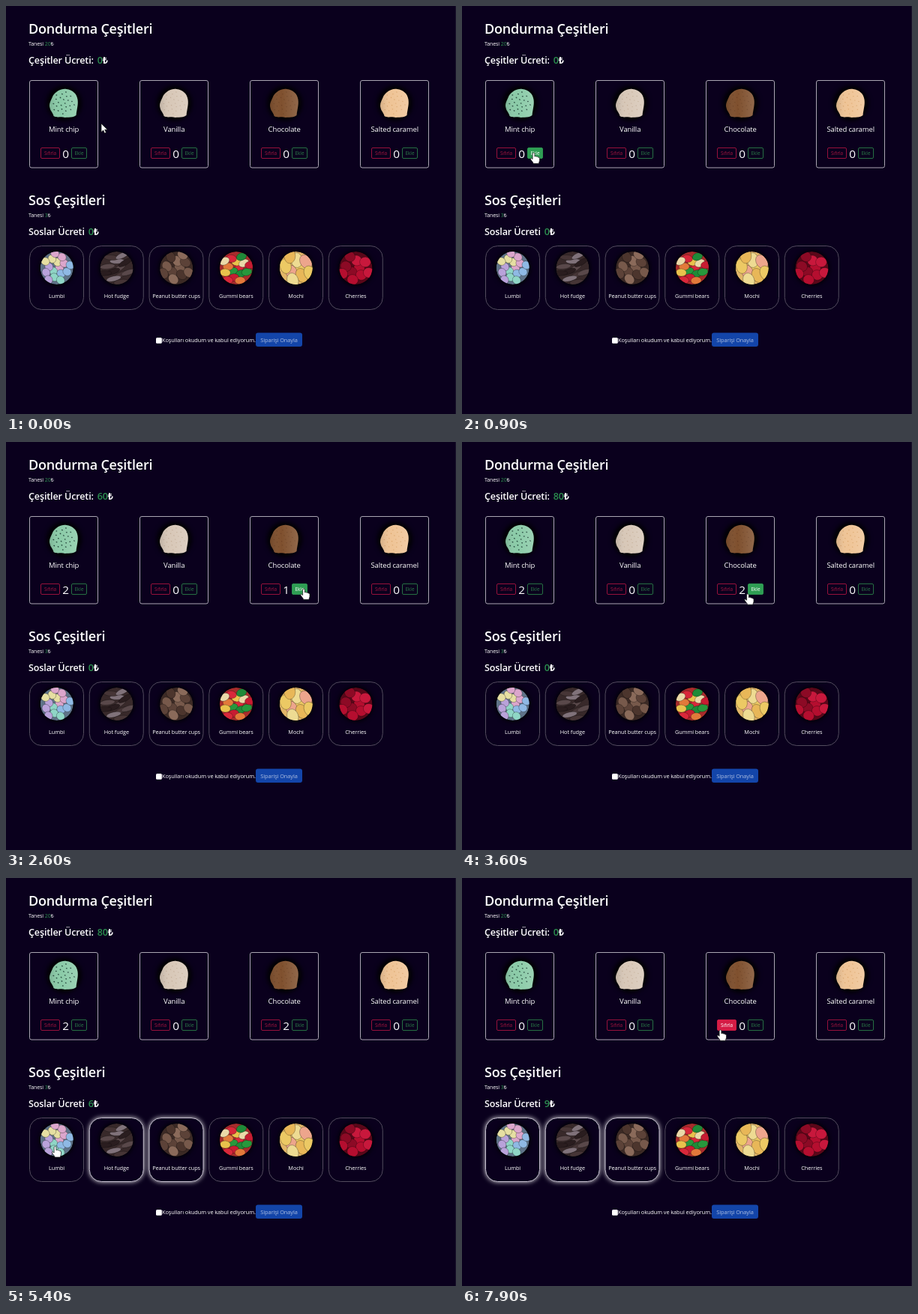
An HTML page that plays this animation: 600x545 px, repeating every 8000 ms.

```html
<!DOCTYPE html>
<html lang="tr">
<head>
<meta charset="utf-8">
<style>
html, body { margin: 0; width: 100%; height: 100%; overflow: hidden; background: #0a001d; }
svg { display: block; width: 600px; height: 545px; }
text { font-family: "Open Sans", "Noto Sans", sans-serif; letter-spacing: -.012em; fill: #fff; white-space: pre; }
.mid { text-anchor: middle; }
.sum, .title { font-weight: 600; }
.green { fill: #2c9150; }
.card { fill: none; stroke: #aaa6b2; }
.sauce rect { fill: #0a001d; stroke: #524c5d; }
.sauce.on rect { stroke: #c4bfce; filter: drop-shadow(.4px .6px 3px #fffd); }
.btn { --c: #2a7d48; --h: #2f9e54; }
.btn.red { --c: #a5143f; --h: #d51c45; }
.btn rect { fill: none; stroke: var(--c); stroke-width: .9; }
.btn text { fill: var(--c); }
.btn.on rect { fill: var(--h); stroke: var(--h); }
.btn.on text { fill: #fff; }
.shade { filter: blur(3px); }
.pieces { stroke: #0005; stroke-width: .8; }
</style>
</head>
<body>
<svg id="stage" viewBox="0 0 600 545"></svg>
<script>
// name, colour, fleck colour, fleck size
const flavours = [
  ["Mint chip", "#8bcba8", "#24483c", 1],
  ["Vanilla", "#d8c8b8", "#c3ad98", .8],
  ["Chocolate", "#7f502e", "#6d4225", .8],
  ["Salted caramel", "#efc496", "#dba66c", .8]
];
// name, backdrop, blob colours, blob count, radii, tilt
const sauces = [
  ["Lumbi", "#5f7388", ["#dca6cc", "#8fd6c6", "#e6dfa2", "#8fb9e4", "#b9a2da"], 16, 5.8, 5.2, 20],
  ["Hot fudge", "#38292a", ["#59484a", "#2a1d1f", "#80727a", "#463536"], 12, 10, 3.4, -35],
  ["Peanut butter cups", "#3c2a25", ["#77594b", "#5c4238", "#8a6a5a", "#4c352d"], 11, 7.4, 6, 25],
  ["Gummi bears", "#a82c2c", ["#d8283a", "#27983c", "#e9c24c", "#1f8a38", "#e2793a", "#ead9a8", "#c81c32"], 15, 7, 5, -30],
  ["Mochi", "#e2b668", ["#ecc964", "#eda58c", "#eedb92", "#e8b758"], 9, 10, 7.5, 50],
  ["Cherries", "#5a0719", ["#b50e2f", "#8c0a25", "#c8183c"], 10, 7.4, 6.8, 0]
];
const cardX = i => 31.5 + i * 147;
const sauceX = i => 31.5 + i * 79.75;

const text = (x, y, size, body, cls = "") =>
  `<text x="${x}" y="${y}" font-size="${size}" class="${cls}">${body}</text>`;
const box = (x, y, w, h, r, more = "") =>
  `<rect x="${x}" y="${y}" width="${w}" height="${h}" rx="${r}" ${more}/>`;
const at = (x, y, body, more = "") => `<g transform="translate(${x} ${y})" ${more}>${body}</g>`;

// Evenly spread ellipses along a sunflower spiral
function blobs(count, reach, rx, ry, tilt, colours) {
  return Array.from({ length: count }, (_, i) => {
    const r = reach * Math.sqrt((i + .5) / count), a = i * 2.4;
    const x = (r * Math.cos(a)).toFixed(1), y = (r * Math.sin(a)).toFixed(1);
    return `<ellipse rx="${rx}" ry="${ry}" fill="${colours[i % colours.length]}"
      transform="translate(${x} ${y}) rotate(${tilt + i * 17 % 40})"/>`;
  }).join("");
}

const button = (id, x, w, label, cls) =>
  `<g id="${id}" class="btn ${cls}">${box(x, 189.5, w, 14, 1.5)}${text(x + w / 2, 199, 6.4, label, "mid")}</g>`;

const dome = "M-18 6C-20 1-16-5-14-10C-10-16-3-20 4-19C12-18 18-13 19-5C20 2 18 7 17 16C12 20 7 18 2 19C-3 17-8 20-13 17C-14 12-17 11-18 6Z";
const scoop = (colour, fleck, size) => `
  <circle cx="1" r="23" class="shade"/>
  <path fill="${colour}" d="${dome}"/>
  ${blobs(24, 15.5, size, size * .75, 0, [fleck])}
  <path fill="url(#light)" d="${dome}"/>`;

const flavourCard = ([name, ...look], i) => at(cardX(i), 0,
  box(0, 99.5, 91, 116.5, 2.5, 'class="card"') +
  at(45, 130, scoop(...look)) +
  text(45.7, 168.3, 9.5, name, "mid") +
  button("reset" + i, 15, 25, "Sıfırla", "red") +
  `<text id="count${i}" x="48" y="203" font-size="15.3" class="mid"></text>` +
  button("add" + i, 56, 20, "Ekle", ""));

const sauceCard = ([name, back, colours, count, rx, ry, tilt], i) => at(sauceX(i), 0,
  box(0, 320.5, 72, 85, 16) +
  at(36.2, 350, `<circle r="23" class="shade"/><g clip-path="url(#disc)"><circle r="22" fill="${back}"/>
    <g class="pieces">${blobs(count, 20, rx, ry, tilt, colours)}</g></g>`) +
  text(36.1, 389.8, 7.35, name, "mid"), `id="sauce${i}" class="sauce"`);

const priceLine = (y, label, x, id) =>
  text(30, y, 12.6, `${label}<tspan id="${id}" x="${x}" class="green"></tspan>₺`, "sum");

const stage = document.getElementById("stage");
stage.innerHTML = `
  <defs>
    <clipPath id="disc"><circle r="22"/></clipPath>
    <linearGradient id="light">
      <stop offset="0" stop-color="#000" stop-opacity=".12"/>
      <stop offset=".4" stop-color="#fff" stop-opacity="0"/>
      <stop offset="1" stop-color="#fff" stop-opacity=".14"/>
    </linearGradient>
  </defs>
  ${box(599, 0, 1, 545, 0, 'fill="#1a122c"')}
  ${text(30, 37, 18, "Dondurma Çeşitleri", "title")}
  ${text(30, 53, 7, 'Tanesi <tspan class="green">20</tspan>₺')}
  ${priceLine(77, "Çeşitler Ücreti: ", 121.7, "scoopPrice")}
  ${flavours.map(flavourCard).join("")}
  ${text(30, 266, 18, "Sos Çeşitleri", "title")}
  ${text(30, 282.3, 7, 'Tanesi <tspan class="green">3</tspan>₺')}
  ${priceLine(306, "Soslar Ücreti ", 109.8, "saucePrice")}
  ${sauces.map(sauceCard).join("")}
  ${box(200, 443, 7.8, 7.8, 1.5, 'fill="#fff"')}
  ${text(208, 448.8, 7.38, "Koşulları okudum ve kabul ediyorum.")}
  ${box(333, 436.6, 62, 18.4, 3, 'fill="#1345a9"')}
  <g opacity=".65">${text(364, 448.8, 7.38, "Siparişi Onayla", "mid")}</g>
  <g id="cursor" fill="#fff" stroke="#111" stroke-width=".7" stroke-linejoin="round">
    <path id="arrow" d="M0 0V11.5L2.7 9L4.5 13L6.5 12.1L4.7 8.2H8.3Z"/>
    <path id="hand" d="M-1.4 1Q0-1 1.4 1V5Q3 4 4 5.3Q5.3 4.7 6 6Q8 5.6 8 7.5V10.5
      Q7.5 12 6.8 14.5H-.5Q-.5 13-2 11.5Q-3.8 9.5-4.5 7.8Q-3.6 6.4-1.4 8.5Z"/>
  </g>`;

// time, x, y
const path = [
  [0, 127, 157], [100, 127, 157], [700, 95.5, 196], [1650, 95.5, 196], [2350, 397, 196],
  [3000, 397, 196], [3450, 381, 202.8], [3650, 381, 202.8], [4150, 228, 366],
  [4400, 228, 366], [4700, 147, 366], [4950, 147, 366], [5300, 65.5, 358.5],
  [5800, 65.5, 358.5], [6450, 66.5, 196], [7000, 66.5, 196], [7600, 344.5, 202.8], [8000, 344.5, 202.8]
];
const clicks = [
  [1000, "add", 0], [1400, "add", 0], [2500, "add", 2], [2900, "add", 2],
  [4300, "sauce", 2], [4800, "sauce", 1], [5600, "sauce", 0], [6800, "reset", 0], [7800, "reset", 2]
];

function pointer(t) {
  const k = path.findIndex(p => p[0] > t);
  const [t0, x0, y0] = path[k - 1], [t1, x1, y1] = path[k];
  const u = (t - t0) / (t1 - t0), e = u * u * (3 - 2 * u);
  return [x0 + (x1 - x0) * e, y0 + (y1 - y0) * e];
}

const get = id => document.getElementById(id);
const inside = (x, y, left, top, w, h) => x >= left && x <= left + w && y >= top && y <= top + h;

function draw(t) {
  const counts = [0, 0, 0, 0], chosen = new Set();
  for (const [when, kind, i] of clicks) {
    if (when > t) break;
    if (kind === "add") counts[i]++;
    else if (kind === "reset") counts[i] = 0;
    else chosen.add(i);
  }
  const [x, y] = pointer(t);
  let link = false;
  const hover = (id, left, w) => {
    const on = inside(x, y, left - .5, 189, w + 1, 15);
    get(id).classList.toggle("on", on);
    link ||= on;
  };
  counts.forEach((n, i) => {
    get("count" + i).textContent = n;
    hover("reset" + i, cardX(i) + 15, 25);
    hover("add" + i, cardX(i) + 56, 20);
  });
  sauces.forEach((_, i) => {
    get("sauce" + i).classList.toggle("on", chosen.has(i));
    link ||= inside(x, y, sauceX(i), 320.5, 72, 85);
  });
  get("scoopPrice").textContent = 20 * counts.reduce((a, b) => a + b);
  get("saucePrice").textContent = 3 * chosen.size;
  get("cursor").setAttribute("transform", `translate(${x} ${y})`);
  get("arrow").style.display = link ? "none" : "";
  get("hand").style.display = link ? "" : "none";
}

const start = performance.now();
function tick() {
  draw((performance.now() - start) % 8000);
  requestAnimationFrame(tick);
}
tick();
</script>
</body>
</html>
```
